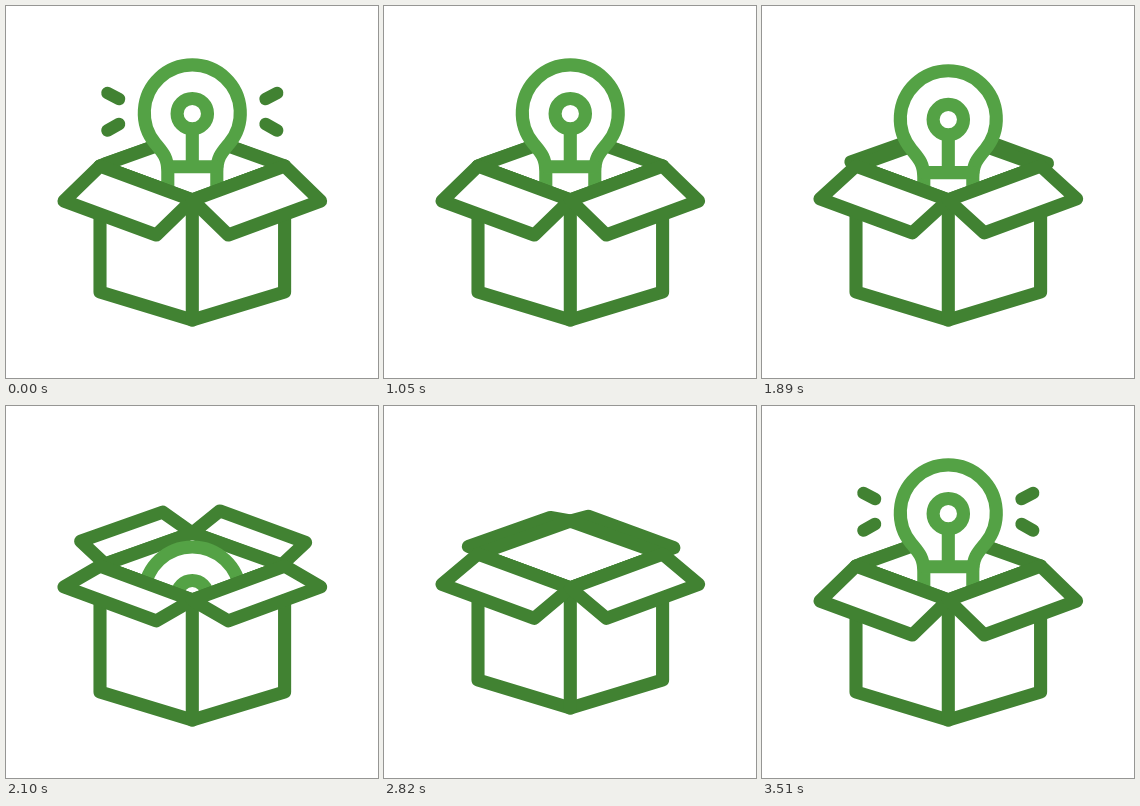
Animation, 372 px wide and 372 px high, one loop 3.6 s. Source, as an HTML page:

```html
<!DOCTYPE html>
<html lang="en">
<head>
<meta charset="utf-8">
<title>Idea box</title>
<style>
  html, body { margin: 0; width: 100%; height: 100%; overflow: hidden; background: #fff; }
  svg { display: block; width: 100vw; height: 100vh; }
  path, line, circle { stroke-width: 13.1; stroke-linecap: round; stroke-linejoin: round; }
  .dark { stroke: #418232; fill: #fff; }
  .light { stroke: #54a245; fill: #fff; }
  .bare { fill: none; }
</style>
</head>
<body>
<svg viewBox="0 0 372 372">
  <defs>
    <clipPath id="mouth"><rect width="372" height="240"/></clipPath>
  </defs>

  <g id="sparks">
    <g id="sparkPair" class="dark">
      <line x1="113" y1="93" x2="101.5" y2="87"/>
      <line x1="113" y1="118" x2="101.5" y2="124.5"/>
    </g>
    <use href="#sparkPair" transform="matrix(-1 0 0 1 372.6 0)"/>
  </g>

  <g id="box">
    <path id="backLeft" class="dark"/>
    <path id="backRight" class="dark"/>
    <path class="dark" d="M94 160L186.3 127L278.6 160L186.3 194Z"/>

    <g clip-path="url(#mouth)">
      <g id="bulb" class="light">
        <path d="M161.8 215V166C161.8 152 157 147 149.5 138A48 48 0 1 1 223.1 138C215.6 147 210.8 152 210.8 166V215"/>
        <path class="bare" d="M161.8 161H210.8M186.3 124V161"/>
        <circle cx="186.3" cy="108" r="15.2"/>
      </g>
    </g>

    <path class="dark" d="M94 160L186.3 194L278.6 160V286L186.3 314L94 286Z"/>
    <path class="dark" d="M186.3 194V314"/>
    <path id="frontFlap" class="dark"/>
    <use href="#frontFlap" transform="matrix(-1 0 0 1 372.6 0)"/>
  </g>
</svg>

<script>
const LOOP = 3600;
const $ = id => document.getElementById(id);
const [box, bulb, sparks, frontFlap, backLeft, backRight] =
  ['box', 'bulb', 'sparks', 'frontFlap', 'backLeft', 'backRight'].map($);
const rays = [...document.querySelectorAll('#sparkPair line')].map(el => ({
  el,
  x: +el.getAttribute('x1'), y: +el.getAttribute('y1'),
  dx: el.getAttribute('x2') - el.getAttribute('x1'),
  dy: el.getAttribute('y2') - el.getAttribute('y1')
}));

// [time, value] keys, eased in and out between neighbours
const tilt = [[300, 0], [680, -10], [1060, 0], [1150, 0], [1560, 10], [1860, 0]];
const sink = [[1830, 0], [2340, 150], [2900, 150], [3430, 0]];
const fold = [[1790, 0], [2320, .9], [2560, .9], [2930, 0]];
const hop = [[2600, 0], [2820, -12], [3040, 0]];
const glow = [[240, 1], [360, 0], [3400, 0], [3510, 1]];

function at(keys, t) {
  const i = keys.findIndex(k => k[0] > t);
  if (i === 0) return keys[0][1];
  if (i < 0) return keys[keys.length - 1][1];
  const [t0, a] = keys[i - 1], [t1, b] = keys[i];
  const p = (t - t0) / (t1 - t0);
  return a + (b - a) * p * p * (3 - 2 * p);
}

// A flap pushes its edge out along (dx, dy); inner is where it meets the box centre line
function flap(el, [x0, y0], [x1, y1], inner, dx, dy) {
  el.setAttribute('d',
    `M${x0} ${y0}L${x0 + dx} ${y0 + dy}L${x1 + dx} ${y1 + dy}L${inner}Z`);
}

function draw(t) {
  const q = at(fold, t);
  const dx = 31.7 * q ** .465, dy = -47.4 * q ** 1.284;
  flap(frontFlap, [94, 160], [186.3, 194], [186.3, 194], -36, 35 - 25 * q);
  flap(backLeft, [99, 158], [181, 129], [186.3, 127], -dx, dy);
  flap(backRight, [275.3, 159.3], [189.5, 127.8], [186.3, 127], dx, dy);

  box.setAttribute('transform', `translate(0 ${at(hop, t)})`);
  bulb.setAttribute('transform',
    `translate(0 ${at(sink, t) - .3}) rotate(${at(tilt, t)} 186.3 196)`);

  const s = at(glow, t);
  sparks.style.display = s > .01 ? '' : 'none';
  for (const r of rays) {
    r.el.setAttribute('x2', r.x + r.dx * s);
    r.el.setAttribute('y2', r.y + r.dy * s);
    r.el.style.strokeWidth = 12.6 * Math.min(1, s * 2);
  }
}

const start = performance.now();
function tick() {
  draw((performance.now() - start) % LOOP);
  requestAnimationFrame(tick);
}
tick();
</script>
</body>
</html>
```
